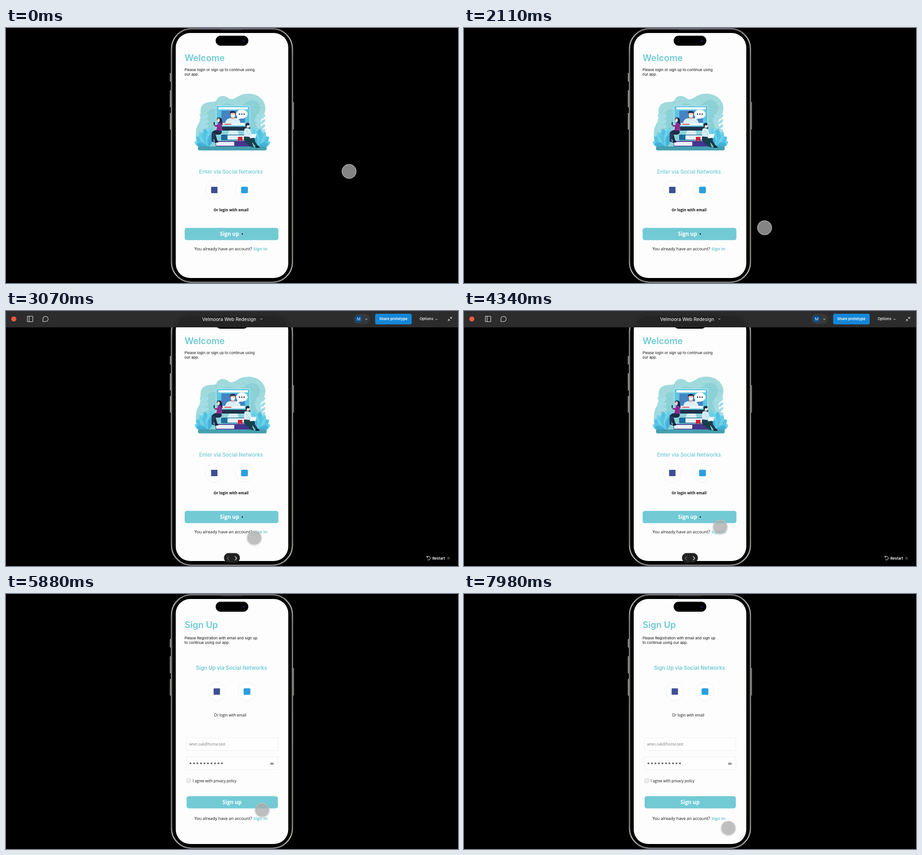
An HTML page with a canvas for the animation above (8 s loop, 996 by 562 pixels).

```html
<!DOCTYPE html>
<html lang="en">
<head>
<meta charset="utf-8">
<title>Sign-up prototype</title>
<style>
html, body { margin: 0; width: 100%; height: 100%; overflow: hidden; background: #000; }
canvas { display: block; width: 996px; height: 562px; }
</style>
</head>
<body>
<canvas id="stage"></canvas>
<script>
const W = 996, H = 562, LOOP = 8000;
const TEAL = '#6ecad3', INK = '#101012', PAPER = '#fdfdfd';
const INTER = 'Inter, sans-serif', OPEN = '"Open Sans", "Noto Sans", sans-serif';
const dpr = window.devicePixelRatio || 1;
const stage = sized(document.getElementById('stage'));
let ctx = stage.getContext('2d');

// Pointer stops: time, x, y
const STOPS = [
  [1600, 756, 316], [1670, 749, 325], [2110, 662.5, 440], [2540, 585, 493],
  [2850, 547, 500], [3400, 547, 500], [3900, 564.5, 476], [6750, 564.5, 476],
  [7150, 583, 519], [7450, 582.5, 516]
];
const SWITCH_AT = 4430;

const clamp = v => Math.max(0, Math.min(1, v));
const ramp = (t, a, b) => clamp((t - a) / (b - a));

function sized(canvas) {
  canvas.width = W * dpr;
  canvas.height = H * dpr;
  return canvas;
}

// Renders once to its own canvas, so it can fade as a whole
function layer(render) {
  const canvas = sized(document.createElement('canvas'));
  const outer = ctx;
  ctx = canvas.getContext('2d');
  ctx.scale(dpr, dpr);
  render();
  ctx = outer;
  return canvas;
}

function box(x, y, w, h, r, fill, line, width = 1) {
  ctx.beginPath();
  ctx.roundRect(x, y, w, h, r);
  paint(fill, line, width);
}

function oval(x, y, rx, ry, fill, line, width = 1) {
  ctx.beginPath();
  ctx.ellipse(x, y, rx, ry, 0, 0, Math.PI * 2);
  paint(fill, line, width);
}

function paint(fill, line, width) {
  if (fill) { ctx.fillStyle = fill; ctx.fill(); }
  if (line) { ctx.strokeStyle = line; ctx.lineWidth = width; ctx.stroke(); }
}

const dot = (x, y, r, fill) => oval(x, y, r, r, fill);

function shape(d, fill) {
  ctx.fillStyle = fill;
  ctx.fill(new Path2D(d));
}

function stroke(d, color, width = 1) {
  ctx.strokeStyle = color;
  ctx.lineWidth = width;
  ctx.stroke(new Path2D(d));
}

function text(str, x, y, size, weight, family, color = INK, align = 'left') {
  ctx.font = `${weight} ${size}px ${family}`;
  ctx.textAlign = align;
  ctx.fillStyle = color;
  ctx.fillText(str, x, y);
}

// Monotone cubic through the stops, so holds stay still
function slope(i, k) {
  if (i === 0 || i === STOPS.length - 1) return 0;
  const rate = j => (STOPS[j + 1][k] - STOPS[j][k]) / (STOPS[j + 1][0] - STOPS[j][0]);
  const a = rate(i - 1), b = rate(i);
  return a * b <= 0 ? 0 : 2 * a * b / (a + b);
}

function pointerAt(t) {
  const last = STOPS.length - 1;
  if (t <= STOPS[0][0]) return STOPS[0].slice(1);
  if (t >= STOPS[last][0]) return STOPS[last].slice(1);
  const i = STOPS.findIndex(s => s[0] > t) - 1;
  const p = STOPS[i], q = STOPS[i + 1], d = q[0] - p[0], u = (t - p[0]) / d;
  return [1, 2].map(k =>
    p[k] * (1 + 2 * u) * (1 - u) ** 2 + q[k] * u * u * (3 - 2 * u) +
    d * (slope(i, k) * u * (1 - u) ** 2 - slope(i + 1, k) * u * u * (1 - u)));
}

function drawPhone() {
  for (const [y, h] of [[99, 19], [137, 38], [187, 37]]) box(361, y, 2.8, h, 1, '#9c9c97');
  box(631.8, 163, 2.6, 61, 1, '#9c9c97');
  const edge = ctx.createLinearGradient(0, 0, 0, H);
  [[0, '#85858a'], [.04, '#c4c4be'], [.12, '#8f8f8b'], [.5, '#9a9a95'],
   [.9, '#96968f'], [.96, '#cdcdc5'], [1, '#8d8d92']].forEach(s => edge.addColorStop(...s));
  box(363.4, .6, 269, 560.8, 45, '#000', '#4a4a4a', .9);
  box(364.7, 1.8, 266.4, 558.4, 44, '#000', edge, 2);
  box(367.3, 4.2, 261.2, 553.6, 41, null, '#262626', .9);
  box(473, 3, 49, 2.2, 1, '#292933');
  box(374, 11, 248, 540, 32, PAPER);
}

function drawIsland() {
  box(462, 17, 72, 22, 11, '#000');
  dot(524, 28, 3.4, '#0b0c1c');
  dot(524, 28, 1.6, '#1d1f4c');
}

function drawSocial(x, y) {
  for (const dx of [0, 66.5]) oval(x + dx, y, 19.3, 20.3, '#fefefe', '#ececf1', .9);
  box(x - 7, y - 7, 14, 14, 1, '#3d4f94');
  box(x + 59, y - 7.2, 15, 14.5, 3, '#2a9fe0');
}

function drawButton(x, y, w, labelX) {
  box(x, y, w, 27, 5, '#72cad5');
  text('Sign up', labelX, y + 17.6, 11.56, 700, OPEN, '#fff');
}

function drawAccountLine(y) {
  text('You already have an account?', 415.2, y, 9.25, 400, OPEN);
  text('Sign In', 545.3, y, 9.25, 700, OPEN, TEAL);
}

function leaf(x, y, angle, len, wide, color, vein) {
  ctx.save();
  ctx.translate(x, y);
  ctx.rotate(angle);
  shape(`M0 0C${-wide} ${-len * .35} ${-wide * .8} ${-len * .8} 0 ${-len}` +
        `C${wide * .8} ${-len * .8} ${wide} ${-len * .35} 0 0`, color);
  stroke(`M0 0V${-len * .85}`, vein, .6);
  ctx.restore();
}

function drawPlant(x, side) {
  ctx.save();
  ctx.translate(x, 261);
  ctx.scale(side, 1);
  stroke('M2 0Q-9 -35 -5 -66', '#a9dfe8', .9);
  for (let i = 0; i < 4; i++) {
    const y = -27 - i * 11;
    leaf(-6, y, -.75, 15, 5, '#a6dfe8', '#8ed0dd');
    leaf(-6, y, .7, 14, 5, '#a6dfe8', '#8ed0dd');
  }
  for (let i = 0; i < 5; i++)
    leaf(2, 0, -1.25 + i * .36, 31 + i * 3, 12, i % 2 ? '#55c3e2' : '#6bd2ea', '#3fa9d0');
  leaf(0, 0, -1.35, 24, 9, '#46b4da', '#3096c2');
  leaf(4, 0, .2, 28, 9, '#4ab6da', '#3096c2');
  ctx.restore();
}

function drawMonitor() {
  box(462.5, 170.5, 75.5, 57, 3, '#b7e6f0');
  box(464, 172, 72.5, 55, 2, '#5fc6e0');
  box(468, 174.5, 65, 5, 1, '#f3fbfd');
  box(474.5, 182, 52, 33, 1, '#4583c3');
  shape('M483 210Q484 200 493 199L507 199Q516 201 517 210Z', '#dceff8');
  box(496.5, 194, 7, 7, 2, '#efb79f');
  oval(500, 190, 5.2, 6.3, '#f3bfa8');
  shape('M494 190Q492 183 499 183Q507 182 506 190L504 187L496 187Z', '#1d2b48');
  box(495.5, 190.5, 9, 5.5, 2.5, '#f4fafc');
  box(474.5, 209, 52, 6, 0, '#e9f6fa');
  box(481, 211.2, 16, 1.8, .9, '#d12c44');
  box(476, 217.5, 62, 8.5, 1, '#20334b');
  shape('M492 226H510L513 235H488Z', '#d8eef3');
  shape('M510 195L508 203L518 199Z', '#fff');
  oval(519.7, 189.8, 12.6, 10, '#fff');
  for (const x of [514.6, 519.7, 524.8]) dot(x, 189.8, 1.5, '#16283c');
}

function drawBooks() {
  box(474, 235, 64, 12.5, 2, '#1c6f9d');
  box(488, 236.5, 38, 9.5, 1, '#edf7fb');
  stroke('M489 239.5H525M489 243H525', '#c4dfe9', .6);
  box(462, 249, 81, 12, 2, '#45358f');
  box(463, 251, 40, 8.5, 1, '#f2f5fb');
  stroke('M464 254H502M464 257H502', '#ccd4e8', .6);
  shape('M511 240H521V250L516 247.5L511 250Z', '#d51f35');
}

function drawReader() {
  shape('M465 203Q463 197 470 197Q477 198 476 207L478 214L470 210Z', '#182642');
  oval(468.3, 203, 3, 4, '#f3bfa8');
  box(465.4, 203.4, 4.5, 3.4, 1.5, '#eef7fa');
  shape('M468 208Q476 207 476 216L475 231L462 231L465 218L460 217L459 214L466 214Z', '#8d2a8e');
  box(457.5, 207.5, 2.6, 6.5, .8, '#20334b');
  shape('M462 225L475 227Q477 233 470 235L462 235L466 249L461 251L453 233Q454 227 462 225Z', '#1c2d4a');
  shape('M453 230L462 233L457 247L460 252L453 250Z', '#263d60');
  shape('M460 250L466 248L468 252L460 253Z', '#12203a');
}

function drawTyper() {
  oval(532.5, 215.5, 3.6, 4.8, '#f3bfa8');
  shape('M528 216Q527 209 533 209Q538 210 536 214L531 214L530 219Z', '#182642');
  box(531.8, 216, 5, 3.6, 1.6, '#eef7fa');
  shape('M526 222Q532 219 538 223L541 234L546 237L544 240L527 242Q522 232 526 222Z', '#d5edf6');
  stroke('M530 225Q533 235 542 238', '#9fcfe0', .9);
  shape('M525 239L545 241Q550 245 548 249L557 262L551 263L541 249L546 263L540 262L526 250Q523 244 525 239Z', '#17404c');
  shape('M550 261L557 260L559 264H550Z', '#0f2634');
  shape('M540 234L552 233L550 242L537 243Z', '#f2f8fb');
}

function drawScene() {
  shape('M424 262C415 236 418 222 424 211C434 196 424 182 432 171C440 161 455 164 463 161' +
        'C468 147 482 147 492 156C501 160 509 151 519 147C541 140 566 149 571 171' +
        'C575 193 556 201 561 215C570 231 580 243 573 262Z', '#a0dadd');
  shape('M428 262C416 240 425 230 435 221C447 210 437 190 448 181C459 176 466 182 473 174' +
        'C487 158 501 174 516 171C532 167 534 154 549 160C568 169 558 190 549 199' +
        'C543 210 563 222 568 262Z', '#8bd1d6');
  stroke('M464 162C457 190 477 197 469 220M517 149C530 171 550 178 570 175', '#7ecacf', .8);
  drawPlant(443, 1);
  drawPlant(555, -1);
  box(423, 261, 151.5, 8.8, 4, '#459faf');
  drawMonitor();
  drawBooks();
  drawReader();
  drawTyper();
}

function drawWelcome() {
  text('Welcome', 393.6, 72.5, 19.6, 600, INTER, TEAL);
  text('Please login or sign up to continue using', 393.3, 95.4, 8.09, 400, INTER);
  text('our app.', 393.3, 105.2, 8.09, 400, INTER);
  drawScene();
  text('Enter via Social Networks', 425.6, 321.1, 11.5, 500, INTER, TEAL);
  drawSocial(459, 357);
  text('Or login with email', 457.6, 404.4, 8.09, 700, OPEN);
  drawButton(393.7, 440.6, 206.6, 471.6);
  dot(520.8, 454, 1.4, '#111');
  drawAccountLine(490.3);
}

function drawSignUp() {
  text('Sign Up', 393.4, 75, 19.6, 600, INTER, TEAL);
  text('Please Registration with email and sign up', 393.3, 100.3, 8.09, 400, INTER);
  text('to continue using our app.', 393.3, 110.1, 8.09, 400, INTER);
  text('Sign Up via Social Networks', 418.6, 167, 11.56, 600, INTER, TEAL);
  drawSocial(464.5, 215);
  text('Or login with email', 458.6, 269.8, 8.09, 400, OPEN);
  for (const y of [317, 359]) box(398, y, 201, 28, 2, '#fefefe', '#ebeaf4', .9);
  text('wren.oak@home.test', 403.4, 333.8, 8.09, 400, OPEN, '#7d7d82');
  for (let i = 0; i < 10; i++) dot(406.4 + i * 7.72, 373.2, 2, '#68686e');
  shape('M581.8 374Q586 368.4 590.2 374Q586 379.6 581.8 374Z', '#55555b');
  dot(586, 374, 1.9, '#fff');
  dot(586, 374, 1.1, '#55555b');
  box(398.6, 407.2, 7.8, 8.6, .8, '#fff', '#b9b9bd', .9);
  stroke('M400.3 411.7L402 413.6L405.2 409.3', '#a5a5aa', .9);
  text('I agree with privacy policy', 411.4, 414.7, 8.09, 400, OPEN);
  drawButton(398, 445.4, 201, 477.1);
  drawAccountLine(498.1);
}

function drawToolbar() {
  box(0, 0, W, 36, 0, '#2c2c2c');
  ctx.save();
  ctx.beginPath();
  ctx.rect(0, 0, W, 36);
  ctx.clip();
  box(364.7, 1.8, 266.4, 558.4, 44, '#292929', '#303030', 1);
  box(374, 11, 248, 540, 32, '#242424');
  ctx.restore();

  dot(17.2, 17.5, 5.6, '#ee5a3c');
  box(47, 11.5, 12, 12, 1, null, '#e8e8e8', 1.1);
  stroke('M51 11.5V23.5', '#e8e8e8', 1.1);
  stroke('M81.3 23.3V17.5A5.8 5.8 0 1 1 87.1 23.3Z', '#e8e8e8', 1.1);

  text('Velmoora Web Redesign', 491.6, 21.8, 10.3, 400, INTER, '#fff', 'center');
  stroke('M560.6 16.5L562.7 18.6L564.8 16.5', '#fff', 1);

  box(765.5, 6.5, 36.5, 22, 11, '#383838');
  dot(777, 17.5, 8.6, '#0b4b85');
  text('M', 777, 20.8, 9, 500, INTER, '#b7dcfb', 'center');
  stroke('M791.8 17L794 19.2L796.2 17', '#fff', 1);
  box(813.5, 6, 80.5, 23.5, 4, '#1587d8');
  text('Share prototype', 853.6, 20.4, 8, 600, INTER, '#fff', 'center');
  text('Options', 911.4, 20.4, 8.1, 500, INTER, '#fff');
  stroke('M946.3 17.4L948.5 19.6L950.7 17.4', '#fff', 1);
  stroke('M983.5 12.5L979.8 16.2M979.8 13V16.2H983M973.5 22.5L977.2 18.8M974 18.8H977.2V22', '#fff', 1);

  box(480.3, 533.5, 35.2, 21.2, 10.6, '#222');
  stroke('M491.5 540.7L487.5 545L491.5 549.3', '#7c7c7c', 1.1);
  stroke('M504.5 540.7L508.5 545L504.5 549.3', '#fff', 1.2);
  stroke('M927.6 542.3A4.1 4.1 0 1 1 928.6 548M927.3 539.8V542.7H930.2', '#fff', 1);
  text('Restart', 939.4, 547.8, 8.1, 600, INTER, '#fff');
  text('R', 972.6, 547.8, 8.1, 500, INTER, '#777');
}

function drawPointer(t) {
  const [x, y] = pointerAt(t);
  oval(x, y + .8, 16.6, 16.6, null, 'rgba(90,90,90,.16)', 1.6);
  dot(x, y, 16, 'rgba(172,172,172,.77)');
  oval(x, y, 15.6, 15.6, null, 'rgba(240,240,240,.75)', .9);
}

const toolbar = layer(drawToolbar);

function draw(t) {
  ctx.setTransform(dpr, 0, 0, dpr, 0, 0);
  ctx.fillStyle = '#000';
  ctx.fillRect(0, 0, W, H);
  drawPhone();
  if (t < SWITCH_AT) drawWelcome(); else drawSignUp();
  // The island stays above the bar once the bar starts to leave
  if (t < SWITCH_AT) drawIsland();
  ctx.globalAlpha = ramp(t, 2560, 2740) * (1 - ramp(t, 4420, 4597));
  ctx.drawImage(toolbar, 0, 0, W, H);
  ctx.globalAlpha = 1;
  if (t >= SWITCH_AT) drawIsland();
  drawPointer(t);
}

const start = performance.now();
function tick() {
  draw((performance.now() - start) % LOOP);
  requestAnimationFrame(tick);
}
tick();
</script>
</body>
</html>
```
